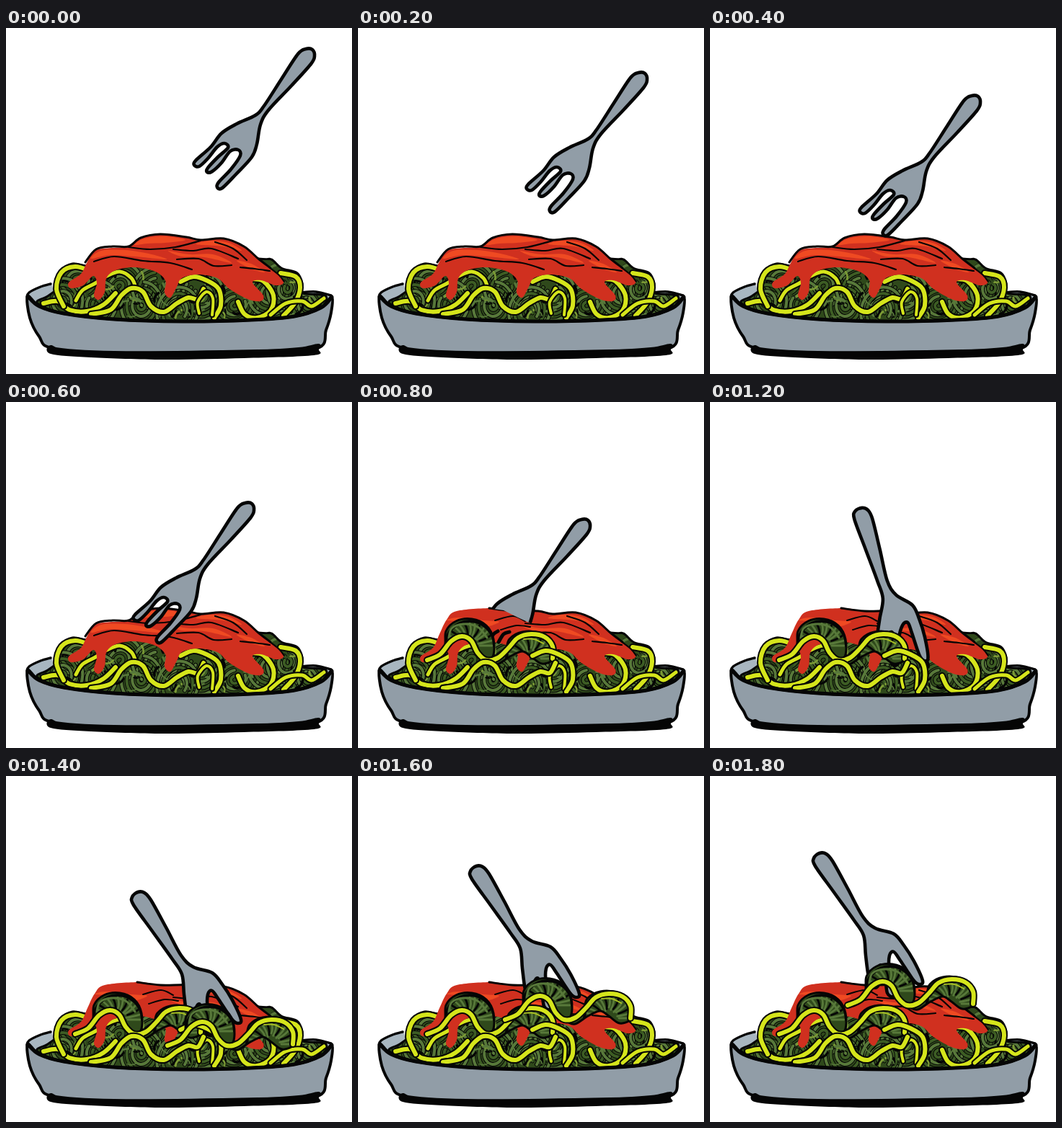
An HTML page with a canvas that plays this animation: 480x480 px, repeating every 2000 ms.

```html
<!DOCTYPE html>
<html lang="en">
<head>
<meta charset="utf-8">
<title>Noodles and fork</title>
<style>
html, body { margin: 0; width: 100%; height: 100%; overflow: hidden; background: #fff; }
canvas { display: block; width: 480px; height: 480px; }
</style>
</head>
<body>
<canvas id="stage" width="480" height="480"></canvas>
<script>
const ctx = document.getElementById('stage').getContext('2d');
const INK = '#050505', STEEL = '#919da7', RED = '#d0301f', BRIGHT = '#ef4a22';
const DEEP = '#2f491b', LEAF = '#58793a', LIME = '#d5e51b', MOSS = '#a5bd23';
const STEP = 200, STEPS = 10;

// Smooth path through a flat list of x, y pairs
function curve(p, closed = false) {
  const n = p.length / 2, path = new Path2D();
  const at = i => {
    const k = closed ? (i + n) % n : Math.max(0, Math.min(n - 1, i));
    return [p[2 * k], p[2 * k + 1]];
  };
  path.moveTo(p[0], p[1]);
  for (let i = 0; i < (closed ? n : n - 1); i++) {
    const [a, b, c, d] = [at(i - 1), at(i), at(i + 1), at(i + 2)];
    path.bezierCurveTo(b[0] + (c[0] - a[0]) / 6, b[1] + (c[1] - a[1]) / 6,
      c[0] - (d[0] - b[0]) / 6, c[1] - (d[1] - b[1]) / 6, c[0], c[1]);
  }
  if (closed) path.closePath();
  return path;
}

function line(path, color, width) {
  ctx.strokeStyle = color;
  ctx.lineWidth = width;
  ctx.stroke(path);
}

function fill(path, color) {
  ctx.fillStyle = color;
  ctx.fill(path);
}

function strand(path, width = 6, color = LIME) {
  line(path, INK, width + 4);
  line(path, color, width);
}

function seeded(seed) {
  return () => (seed = seed * 16807 % 2147483647) / 2147483647;
}

const mass = curve([45, 383, 58, 372, 72, 360, 76, 338, 92, 327, 116, 330, 140, 322, 240, 310, 350, 320,
  368, 321, 382, 333, 404, 340, 411, 355, 412, 368, 444, 372, 428, 393, 340, 412, 240, 414, 110, 405], true);

const strands = [
  [[52, 382, 72, 379, 88, 391, 112, 393, 135, 384, 152, 368], 6],
  [[80, 386, 70, 362, 77, 339, 96, 331, 118, 337], 6],
  [[97, 378, 106, 364, 124, 354, 140, 344, 158, 338, 174, 347, 180, 360], 5],
  [[118, 397, 145, 391, 160, 371, 174, 361, 190, 366, 201, 386, 219, 394, 237, 382, 253, 374, 266, 376, 274, 362], 6],
  [[242, 352, 260, 345, 278, 350, 295, 362, 298, 385, 289, 402], 6],
  [[268, 396, 266, 380, 278, 366, 287, 375, 286, 398], 4],
  [[322, 380, 331, 397, 348, 402, 367, 392, 371, 371, 357, 351, 340, 348], 6],
  [[381, 340, 402, 345, 408, 360, 401, 381, 385, 399], 6],
  [[367, 398, 388, 382, 411, 379, 424, 386, 441, 375], 5]
].map(([p, w]) => [curve(p), w]);

const coils = [[100, 350], [157, 358], [208, 360], [188, 385], [273, 373], [318, 385], [368, 368], [391, 361], [125, 383], [238, 392], [418, 384], [78, 380]];

function drawNoodles() {
  fill(mass, DEEP);
  ctx.save();
  ctx.clip(mass);
  const rnd = seeded(41);
  for (const [x, y] of coils) {
    const turn = rnd() * 6;
    for (let r = 33; r > 4; r -= 9) {
      const ring = new Path2D();
      ring.ellipse(x, y, r, r * .85, turn, 0, 5);
      line(ring, INK, 6);
      line(ring, r % 2 ? LEAF : '#3d5d24', 4);
    }
  }
  for (let i = 0; i < 115; i++) {
    const x = 55 + rnd() * 375, y = 327 + rnd() * 77, r = 6 + rnd() * 11, a = rnd() * 6;
    const arc = new Path2D();
    arc.arc(x, y, r, a, a + .6 + rnd());
    line(arc, [INK, DEEP, LEAF, '#7b9a35', INK][i % 5], 1.5 + rnd() * 2.5);
  }
  ctx.restore();
  line(mass, INK, 3);
  for (const [path, w] of strands) strand(path, w);
}

const drips = [385, 352, 374, 357, 354, 350, 342, 353, 357, 371, 353, 379, 335, 376, 310, 362, 293, 347, 266, 342,
  244, 347, 237, 359, 228, 374, 220, 367, 221, 350, 205, 337, 175, 332, 150, 337, 139, 348, 137, 366,
  129, 377, 122, 371, 126, 354, 121, 344, 107, 357, 90, 361, 87, 353, 104, 341];
const ridge = [250, 290, 270, 294, 302, 292, 330, 303, 350, 320, 367, 333];
const sauces = [
  [112, 326, 125, 308, 170, 303, 187, 291, 214, 286],
  [113, 322, 123, 302, 137, 290, 185, 286, 214, 290]
].map(left => curve([...left, ...ridge, ...drips], true));

const wholeTop = curve([110, 325, 125, 307, 148, 303, 170, 303, 187, 291, 214, 286, ...ridge]);
const tornTop = curve([182, 286, 214, 290, ...ridge]);
const folds = [
  [170, 304, 200, 307, 235, 304, 270, 295], [122, 324, 150, 317, 190, 323, 228, 326, 258, 335],
  [232, 307, 260, 309, 285, 306, 322, 320], [237, 321, 267, 320, 288, 330, 313, 329],
  [290, 297, 315, 306, 334, 322], [325, 332, 345, 334, 366, 337]
].map(p => curve(p));
const shines = [
  [178, 301, 192, 292, 220, 289, 249, 294, 221, 298, 196, 299],
  [118, 320, 132, 309, 165, 308, 198, 313, 223, 321, 180, 317, 145, 315],
  [264, 300, 284, 295, 309, 298, 327, 309, 301, 303],
  [225, 309, 254, 314, 287, 314, 313, 326, 275, 318, 244, 317],
  [320, 323, 340, 327, 359, 339, 340, 334]
].map(p => curve(p, true));
const tornShine = curve([124, 303, 139, 299, 174, 303, 196, 305, 175, 312, 152, 305], true);

function drawSauce(torn) {
  const shape = sauces[+torn];
  fill(shape, RED);
  ctx.save();
  ctx.clip(shape);
  shines.forEach((s, i) => { if (!torn || i > 1) fill(s, BRIGHT); });
  if (torn) fill(tornShine, BRIGHT);
  ctx.restore();
  folds.forEach((f, i) => { if (!torn || i > 1) line(f, INK, 2.2); });
  if (torn) {
    line(curve([190, 303, 215, 297, 232, 304]), INK, 2);
    line(curve([198, 316, 220, 310, 239, 312]), INK, 2);
  }
  line(torn ? tornTop : wholeTop, INK, 3);
  line(curve([365, 332, 379, 343, 386, 352]), INK, 2);
}

const backRim = curve([29, 374, 32, 367, 48, 359, 62, 355, 72, 367, 120, 374, 390, 368, 420, 366, 451, 371,
  440, 388, 390, 402, 240, 408, 90, 400, 45, 388], true);
const rim = [30, 372, 46, 386, 80, 396, 150, 404, 245, 407, 340, 405, 400, 400, 437, 388, 452, 373];
const bowl = curve([...rim, 451, 395, 444, 419, 432, 444, 350, 448, 150, 450, 64, 444, 46, 428, 33, 402], true);
const base = curve([62, 440, 92, 449, 200, 450, 340, 447, 406, 443, 434, 438, 434, 446, 427, 454,
  330, 458, 220, 460, 118, 457, 62, 452], true);

function drawBackRim() {
  fill(backRim, '#a8b6c0');
  line(curve([29, 374, 32, 367, 48, 359, 62, 355]), INK, 3.5);
  line(curve([408, 367, 430, 366, 451, 371]), INK, 3.5);
}

function drawBowl() {
  fill(bowl, STEEL);
  line(bowl, INK, 4);
  line(curve(rim), INK, 5);
  fill(base, INK);
}

const loweredFork = curve([416, 29, 405, 36, 382, 71, 358, 108, 346, 121, 320, 133, 299, 146, 284, 165, 263, 184,
  261, 190, 268, 192, 280, 181, 293, 165, 303, 160, 308, 166, 294, 179, 280, 194, 279, 200, 286, 199,
  299, 187, 311, 171, 322, 169, 325, 177, 312, 196, 295, 214, 293, 221, 300, 222, 319, 203, 341, 179,
  348, 161, 353, 134, 364, 114, 396, 80, 423, 50, 428, 39, 425, 30], true);
const liftedFork = curve([152, 107, 144, 114, 146, 125, 171, 160, 199, 199, 213, 221, 216, 249, 220, 278, 227, 293,
  234, 289, 233, 268, 238, 263, 243, 279, 246, 301, 254, 306, 257, 297, 249, 269, 249, 249, 255, 244, 264, 256,
  282, 283, 290, 289, 295, 284, 283, 257, 269, 235, 255, 219, 229, 211, 212, 195, 191, 156, 170, 118, 161, 108], true);

function drawFork(shape, dx, dy, angle = 0, px = 0, py = 0) {
  ctx.save();
  ctx.translate(px + dx, py + dy);
  ctx.rotate(angle);
  ctx.translate(-px, -py);
  fill(shape, STEEL);
  line(shape, INK, 4.6);
  ctx.restore();
}

// A forkful: two humps joined by one bright wavy noodle
const humpLeft = curve([203, 337, 227, 322, 230, 298, 244, 284, 266, 281, 286, 290, 296, 309, 295, 333, 281, 337,
  268, 314, 255, 304, 240, 310, 224, 328], true);
const humpRight = curve([290, 338, 311, 328, 318, 309, 336, 299, 360, 301, 377, 316, 378, 337, 363, 343, 348, 333,
  336, 326, 319, 333, 301, 344], true);
const wave = curve([204, 338, 222, 330, 237, 312, 252, 305, 265, 311, 274, 328, 286, 338, 302, 335, 317, 321,
  330, 307, 348, 302, 367, 306, 378, 319, 378, 336]);

function hatch(shape, cx, cy) {
  fill(shape, DEEP);
  ctx.save();
  ctx.clip(shape);
  for (let i = 0; i < 15; i++) {
    const a = Math.PI * (1 + i / 14), ray = new Path2D();
    const c = Math.cos(a), s = Math.sin(a), r = 11 + i * 7 % 5;
    ray.moveTo(cx + c * r, cy + s * r);
    ray.quadraticCurveTo(cx + c * 22 + 3, cy + s * 22, cx + c * 31, cy + s * 31);
    line(ray, i % 3 ? LEAF : INK, 2.8);
  }
  const band = new Path2D();
  band.arc(cx, cy, 34, Math.PI, 0);
  line(band, INK, 4);
  ctx.restore();
  line(shape, INK, 3);
}

function drawForkful(dx, dy) {
  ctx.save();
  ctx.translate(dx, dy);
  hatch(humpLeft, 263, 318);
  hatch(humpRight, 348, 336);
  line(curve([234, 307, 238, 294, 254, 288, 274, 292, 287, 307]), LEAF, 3);
  strand(wave, 6);
  line(curve([338, 309, 352, 309, 365, 315]), MOSS, 2);
  ctx.restore();
}

function clipAboveSauce() {
  const area = new Path2D('M0 0H480V310H246L222 299L202 289L182 286L0 286Z');
  ctx.clip(area);
}

const drops = [[0, 0], [-27, 33], [-53, 65], [-84, 111], [-106, 134]];
const lifts = [[31, 54], [12, 18], [0, 0]];
const loads = [[20, 36], [0, 0], [-13, -20]];

function drawTool(step) {
  if (step < 4) {
    drawFork(loweredFork, ...drops[step]);
  } else if (step < 6) {
    ctx.save();
    clipAboveSauce();
    drawFork(loweredFork, ...drops[4], step === 5 ? -.48 : 0, 346, 136);
    ctx.restore();
    if (step === 4) {
      line(curve([183, 331, 188, 322, 194, 318]), INK, 5);
      line(curve([195, 333, 202, 322, 210, 319]), INK, 5);
    }
  } else if (step === 6) {
    drawFork(liftedFork, 58, 40, .265, 153, 110);
  } else {
    drawFork(liftedFork, ...lifts[step - 7]);
  }
}

function draw(step) {
  const torn = step > 3;
  ctx.fillStyle = '#fff';
  ctx.fillRect(0, 0, 480, 480);
  ctx.lineCap = ctx.lineJoin = 'round';
  drawBackRim();
  drawNoodles();
  drawSauce(torn);
  drawTool(step);
  if (torn) {
    drawForkful(-108, 20);
    strand(strands[3][0]);
    strand(strands[4][0]);
  }
  if (step > 6) drawForkful(...loads[step - 7]);
  drawBowl();
}

const start = performance.now();
function tick() {
  draw(Math.floor((performance.now() - start) / STEP) % STEPS);
  requestAnimationFrame(tick);
}
tick();
</script>
</body>
</html>
```
